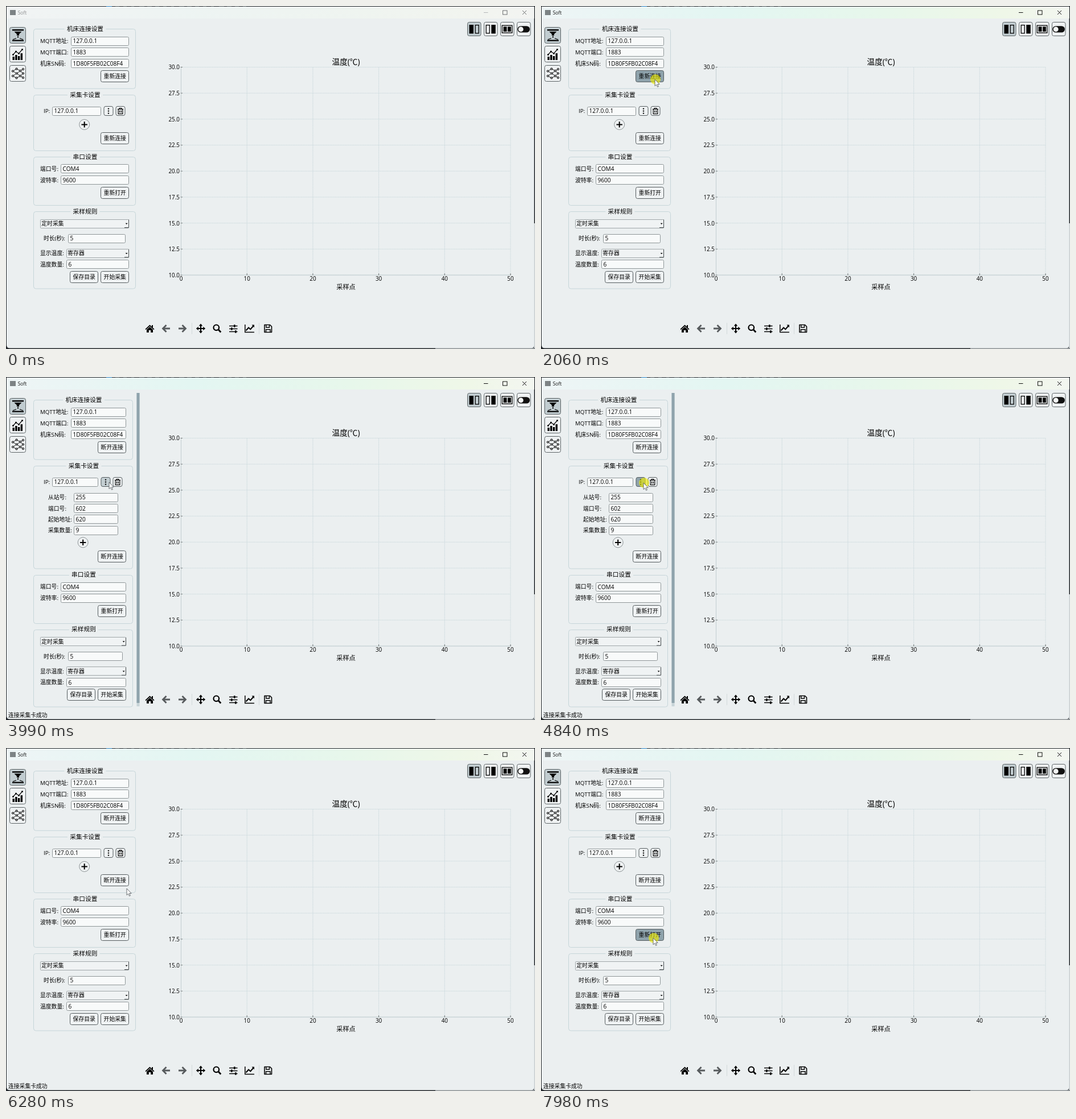
An HTML page that plays this animation: 929x603 px, repeating every 8 s.

```html
<!DOCTYPE html>
<html lang="zh-CN">
<head>
<meta charset="utf-8">
<title>Soft</title>
<style>
html, body { margin: 0; width: 100%; height: 100%; overflow: hidden; background: #ebeff0; }
svg { display: block; width: 100vw; height: 100vh; }
text { font-family: "Open Sans", "Noto Sans CJK SC", "Noto Sans CJK", sans-serif; white-space: pre; }
</style>
</head>
<body>
<svg viewBox="0 0 929 603">
  <defs>
    <linearGradient id="bar">
      <stop offset="0" stop-color="#eef5f6"/>
      <stop offset=".35" stop-color="#e3f6f2"/>
      <stop offset=".65" stop-color="#e7f7eb"/>
      <stop offset=".88" stop-color="#eff7e8"/>
      <stop offset="1" stop-color="#f3f6f0"/>
    </linearGradient>
  </defs>
  <g id="base"></g><g id="head"></g><g id="side"></g>
  <g id="mouse">
    <circle id="spot" r="9" cx="1" fill="#f0ee00" opacity=".62"/>
    <path d="M0 0V11.6L2.7 9.2L4.6 13.3L6.4 12.5L4.6 8.5H8.2Z" fill="#fbfcfc" stroke="#4a4f52" stroke-width=".8" stroke-linejoin="round"/>
  </g>
</svg>
<script>
const LOOP = 8000, BG = '#ebeff0';
const $ = id => document.getElementById(id);

// shape helpers
const rect = (x, y, w, h, fill, more = '') => `<rect x="${x}" y="${y}" width="${w}" height="${h}" fill="${fill}" ${more}/>`;
const path = (d, fill = '#000', more = '') => `<path d="${d}" fill="${fill}" ${more}/>`;
const line = (d, color = '#000', w = 1, more = '') => path(d, 'none', `stroke="${color}" stroke-width="${w}" ${more}`);
const disc = (x, y, r, fill = '#000', more = '') => `<circle cx="${x}" cy="${y}" r="${r}" fill="${fill}" ${more}/>`;
const text = (s, x, cy, { size = 9.8, anchor = 'start', fill = '#000', weight = 400 } = {}) =>
  `<text x="${x}" y="${(cy + size * .365).toFixed(2)}" style="font-size:${size}px;fill:${fill};font-weight:${weight}" text-anchor="${anchor}">${s}</text>`;
const frame = (x1, x2, cy, h, fill, stroke, r) =>
  rect(x1 + .5, Math.round(cy - h / 2) + .5, x2 - x1 - 1, h - 1, fill, `stroke="${stroke}" rx="${r}"`);

// ---- fixed parts ----
function edges() {
  let s = rect(0, 0, 929, 603, '#23272b') + rect(176, 0, 10, 1.5, '#2b83c9');
  for (let x = 192; x < 420; x += 14) s += rect(x, 0, 5 + x % 5, 1, '#4d5357');
  s += rect(927, 382, 2, 221, '#c9ced0') + rect(754, 601, 175, 2, '#8d9295');
  return s + path('M1 1H927.5V596Q927.5 601.5 922 601.5H7Q1 601.5 1 596Z', BG);
}

function chart() {
  const L = 307.5, R = 886, T = 107.5, B = 473;
  const tick = { size: 9.9, weight: 500 };
  let s = '';
  for (let i = 0; i <= 8; i++) {
    const y = T + (B - T) * i / 8;
    s += line(`M${L} ${y}H${R}`, '#cad8dc', .8, 'stroke-dasharray="2 .6"');
    s += line(`M306.5 ${y}h3`, '#333', .9);
    s += text((30 - 2.5 * i).toFixed(1), 305, y + .3, { ...tick, anchor: 'end' });
  }
  for (let i = 0; i <= 5; i++) {
    const x = L + (R - L) * i / 5;
    s += line(`M${x} ${T}V${B}`, '#cad8dc', .8, 'stroke-dasharray="2 .6"');
    s += line(`M${x} 470.5v3`, '#333', .9);
    s += text(10 * i, x, 479.5, { ...tick, anchor: 'middle' });
  }
  s += line(`M${L} ${T}V${B}H${R}`, '#c3ced1', 1);
  s += text('温度(℃)', 597, 98.5, { size: 13.6, anchor: 'middle' });
  return s + text('采样点', 597, 493.8, { size: 11.2, anchor: 'middle' });
}

function tools() {
  const grey = '#575b5d';
  let s = path('M244.5 568L252.5 560.5L260.5 568L259.4 569.2L252.5 562.9L245.6 569.2Z') +
    path('M247 569L252.5 564L258 569V574H254.2V570H250.8V574H247Z') + rect(256, 561, 2, 4, '#000');
  s += line('M288 567H276M281.5 561L275.5 567L281.5 573', grey, 2.8);
  s += line('M303 567H315M309.5 561L315.5 567L309.5 573', grey, 2.8);
  s += line('M326.5 557V577M444.5 557V577', '#d3d9db');
  s += line('M336 567H348M342 561V573', '#000', 2);
  s += path('M342 558.5l3.3 4h-6.6ZM342 575.5l3.3-4h-6.6ZM333.8 567l4-3.3v6.6ZM350.2 567l-4-3.3v6.6Z');
  s += disc(369.3, 565.3, 4.8, 'none', 'stroke="#000" stroke-width="2.2"') + line('M372.8 568.8L377.3 573.5', '#000', 2.8);
  s += line('M392 562.5H406.5M392 567.5H406.5M392 572.5H406.5', '#000', 1.7);
  s += rect(400, 560.3, 2.6, 4.4, '#000') + rect(395, 565.3, 2.6, 4.4, '#000') + rect(402, 570.3, 2.6, 4.4, '#000');
  s += line('M419.8 560V573.6H436', '#000', 1.5) + line('M421.5 570.5L426 565.5L429.3 568.3L434.3 562.5', '#000', 2);
  s += path('M431.5 560.6H436V565.2Z');
  s += line('M454 560.5H463.5L466.5 563.5V573.5H454Z', '#000', 1.6, 'stroke-linejoin="round"');
  return s + line('M456.8 561V565H462.5V561M456.5 573V568.8H464V573', '#000', 1.4);
}

function pages() {
  let s = '';
  [37, 70, 104].forEach((y, i) =>
    s += rect(6.5, y + .5, 28, 28, i ? '#eff2f3' : '#c1ccd0', 'stroke="#5d6466" rx="3"'));
  s += rect(11, 41, 20, 2.4, '#000') + path('M14.5 45H27.5L23 49.5V52H19V49.5Z') + path('M20 53H22L21.6 56H20.4Z');
  s += line('M12 59L18 56.8M30 59L24 56.8', '#000', 1.2) + rect(11, 59.6, 20, 2.2, '#000');
  [[11.5, 6], [16.2, 9], [20.9, 7], [25.6, 12]].forEach(([x, h]) => s += rect(x, 95 - h, 3.4, h, '#000'));
  const trend = [[12.5, 85.5], [17.5, 80], [22.5, 83.5], [28.5, 76.5]];
  s += line('M' + trend.join('L'), '#000', 1.2);
  trend.forEach(p => s += disc(...p, 1.5));
  const cols = [[[12, 114.5], [12, 123]], [[18.5, 110.5], [19, 118.5], [18.5, 126.5]], [[25, 114], [25, 123]], [[30, 111], [30, 118.5], [30, 126]]];
  for (let i = 0; i < 3; i++)
    for (const a of cols[i]) for (const b of cols[i + 1])
      if (Math.abs(a[1] - b[1]) < 6) s += line(`M${a}L${b}`, '#000', .9);
  cols.flat().forEach(p => s += disc(...p, 1.5, '#eff2f3', 'stroke="#000" stroke-width="1.1"'));
  return s;
}

function views() {
  let s = '';
  for (let i = 0; i < 4; i++)
    s += rect(810.5 + 29 * i, 28.5, 23.5, 24, i ? '#eff2f3' : '#c1ccd0', 'stroke="#5d6466" rx="3"');
  const open = 'stroke="#000" stroke-width="1.3"';
  s += rect(813.5, 33, 7.5, 15.5, '#000') + rect(824.2, 33.6, 6, 14.3, 'none', open);
  s += rect(843.2, 33.6, 6, 14.3, 'none', open) + rect(852.3, 33, 7.5, 15.5, '#000');
  s += rect(871.2, 34.2, 17.6, 13, 'none', open) + rect(873.5, 36.3, 6, 8.8, '#000') + rect(881, 36.3, 5.8, 8.8, '#000');
  return s + rect(898.3, 35.2, 21.6, 11.4, '#111', 'rx="5.7"') + disc(904.2, 40.9, 4.4, '#f4f6f6');
}

function header(t) {
  const on = t >= 2060, [c1, c2] = on ? ['#111', '#111'] : ['#8d8f90', '#6c6f70'];
  const tint = on ? 1 : t < 30 ? .35 : t < 220 ? .15 : 0;
  return rect(1, 1.5, 926.5, 20.5, '#f3f3f3') + rect(1, 1.5, 926.5, 20.5, 'url(#bar)', `opacity="${tint}"`) +
    rect(7, 7, 10, 9, '#7d8385') + text('Soft', 20.7, 11.6, { size: 8.5, fill: c1 }) +
    line('M839 11.5H846.5', on ? '#111' : '#b4b6b7') + rect(872.5, 8, 7.5, 7, 'none', `stroke="${c2}"`) +
    line('M907 8L914 15M914 8L907 15', c2);
}

// ---- pointer: start, end, x, y ----
const moves = [
  [760, 880, 300, 289], [1040, 1050, 293, 274], [1080, 1450, 200, 129],
  [2490, 2930, 195, 234], [3640, 3840, 181, 185], [4130, 4440, 182, 185.5], [4600, 4610, 180, 186],
  [4960, 5180, 139, 206], [5300, 5330, 142, 203], [5430, 5780, 200, 214], [5980, 6080, 212, 247],
  [6320, 6420, 198, 234], [6870, 7060, 234, 262], [7090, 7250, 262, 318], [7250, 7370, 258, 348],
  [7370, 7650, 197, 334]
];
const clicks = [[2020, 2140], [3490, 3600], [3860, 3960], [4810, 4900], [5210, 5300],
  [5860, 5950], [6450, 6540], [6740, 6830], [7980, LOOP]];

function pointer(t) {
  let x = 911, y = 559;
  for (const [a, b, nx, ny] of moves) {
    if (t < a) break;
    const k = Math.min(1, (t - a) / (b - a)), e = k * k * (3 - 2 * k);
    x += (nx - x) * e;
    y += (ny - y) * e;
  }
  return { x, y, shown: t >= 760, down: clicks.some(([a, b]) => t >= a && t < b) };
}

// ---- settings column ----
function settings(t, m) {
  const linked = t >= 2140, card = t >= 3600 && t < 6540 || t >= 6830;
  const wide = t >= 3960 && t < 4900, extra = t >= 5300 && t < 5950;
  const d = wide ? 5 : 0, s = wide ? 82.5 : extra ? 29.5 : 0, right = 216 - d;

  const tone = (x1, x2, cy, h) =>
    !m.shown || m.x < x1 || m.x > x2 || Math.abs(m.y - cy) > h / 2 ? '#eff2f3' : m.down ? '#8fa3ac' : '#c3ced2';
  const label = (str, x, cy) => text(str, x, cy);
  const input = (str, x1, x2, cy, hint) => frame(x1, x2, cy, 16, '#f8fafa', '#8f9698', 2) +
    text(str, x1 + 3.5, cy, hint ? { fill: '#8a8f91' } : { size: 10.1, weight: 500 });
  const key = (x1, x2, cy, h) => frame(x1, x2, cy, h, tone(x1, x2, cy, h), '#555c5f', 3);
  const button = (str, cy, x2 = right) => key(x2 - 50, x2, cy, 21) + text(str, x2 - 24.8, cy, { anchor: 'middle' });
  const combo = (str, x1, cy) => frame(x1, right, cy, 16, '#f0f3f4', '#a0a7a9', 1) + label(str, x1 + 2.3, cy) +
    line(`M${right - 8} ${cy + 7}H${right - .5}V${cy - 7}`, '#444a4c') +
    path(`M${right - 6.3} ${cy - .8}h4l-2 2.4Z`);
  const group = (str, y1, y2) => {
    const mid = 139 - d / 2, half = str.length * 5.4 + 4;
    return rect(48.5, Math.round(y1) + .5, 179 - d, y2 - y1, 'none', 'stroke="#c6d5d9" rx="4"') +
      rect(mid - half, y1 - 3, half * 2, 7, BG) + text(str, mid, y1, { size: 10.7, anchor: 'middle' });
  };
  const device = (str, cy, hint) => {
    const a = 171.5 - d, b = 192.5 - d, c = b + 8.5;
    let o = label('IP:', 66, cy) + input(str, 81, 167 - d, cy, hint) + key(a, a + 17, cy, 17) + key(b, b + 17, cy, 17);
    for (const k of [-4, 0, 4]) o += disc(a + 8.5, cy + k, 1.2);
    return o + line(`M${c - 5} ${cy - 3.3}h10M${c - 1.8} ${cy - 3.5}v-1.6h3.6v1.6`, '#000', 1.2) +
      line(`M${c - 3.8} ${cy - 3}v8h7.6v-8M${c - 1.4} ${cy - 1}v4M${c + 1.4} ${cy - 1}v4`, '#000', 1.2);
  };

  let o = group('机床连接设置', 40.3, 145);
  [['MQTT地址:', '127.0.0.1'], ['MQTT端口:', '1883'], ['机床SN码:', '1D80F5FB02C08F4']].forEach(([a, b], i) =>
    o += label(a, 60, 61.6 + 19.7 * i) + input(b, 114, right, 61.6 + 19.7 * i));
  o += button(linked ? '断开连接' : '重新连接', 123.7);

  o += group('采集卡设置', 156, 254 + s) + device('127.0.0.1', 184.6);
  if (extra) o += device('采集卡IP地址', 214, true);
  if (wide) [['从站号:', 255], ['端口号:', 602], ['起始地址:', 620], ['采集数量:', 9]].forEach(([a, b], i) =>
    o += label(a, 74, 211.8 + 19.3 * i) + input(b, 119, 197, 211.8 + 19.3 * i));
  const px = 137.7 - d / 2, py = 208.4 + s;
  o += disc(px, py, 9, tone(px - 9, px + 9, py, 18), 'stroke="#8b9294"') +
    line(`M${px - 5.2} ${py}h10.4M${px} ${py - 5.2}v10.4`, '#000', 2);
  o += button(card ? '断开连接' : '重新连接', 232.6 + s);

  o += group('串口设置', 265 + s, 350 + s);
  o += label('端口号:', 60, 286.4 + s) + input('COM4', 96, right, 286.4 + s);
  o += label('波特率:', 60, 306.2 + s) + input('9600', 96, right, 306.2 + s);
  o += button('重新打开', 328.6 + s);

  o += group('采样规则', 361 + s, 496.5 + s) + combo('定时采集', 60, 382.5 + s);
  o += label('时长(秒):', 66, 408.5 + s) + input(5, 109, right - 6, 408.5 + s);
  o += label('显示温度:', 60, 434.7 + s) + combo('寄存器', 106, 434.7 + s);
  o += label('温度数量:', 60, 454.4 + s) + input(6, 106, right, 454.4 + s);
  o += button('保存目录', 476.2 + s, right - 54) + button('开始采集', 476.2 + s);

  if (wide) o += rect(229.5, 28, 5, 551, '#c8d4d8') + rect(229.5, 28, 5, 545, '#8fa3ac');
  const note = t < 2160 ? '' : t < 3600 ? '连接机床成功' : card ? '连接采集卡成功' : '断开采集卡成功';
  return o + text(note, 4, 594);
}

const drawn = {};
function put(id, html) {
  if (drawn[id] !== html) $(id).innerHTML = drawn[id] = html;
}

put('base', edges() + chart() + tools() + pages() + views());
const start = performance.now();
function tick(now) {
  const t = Math.max(0, now - start) % LOOP, m = pointer(t);
  put('head', header(t));
  put('side', settings(t, m));
  $('mouse').setAttribute('transform', `translate(${m.x.toFixed(1)} ${m.y.toFixed(1)})`);
  $('mouse').setAttribute('visibility', m.shown ? 'visible' : 'hidden');
  $('spot').setAttribute('opacity', m.down ? .62 : 0);
  requestAnimationFrame(tick);
}
tick(start);
</script>
</body>
</html>
```
